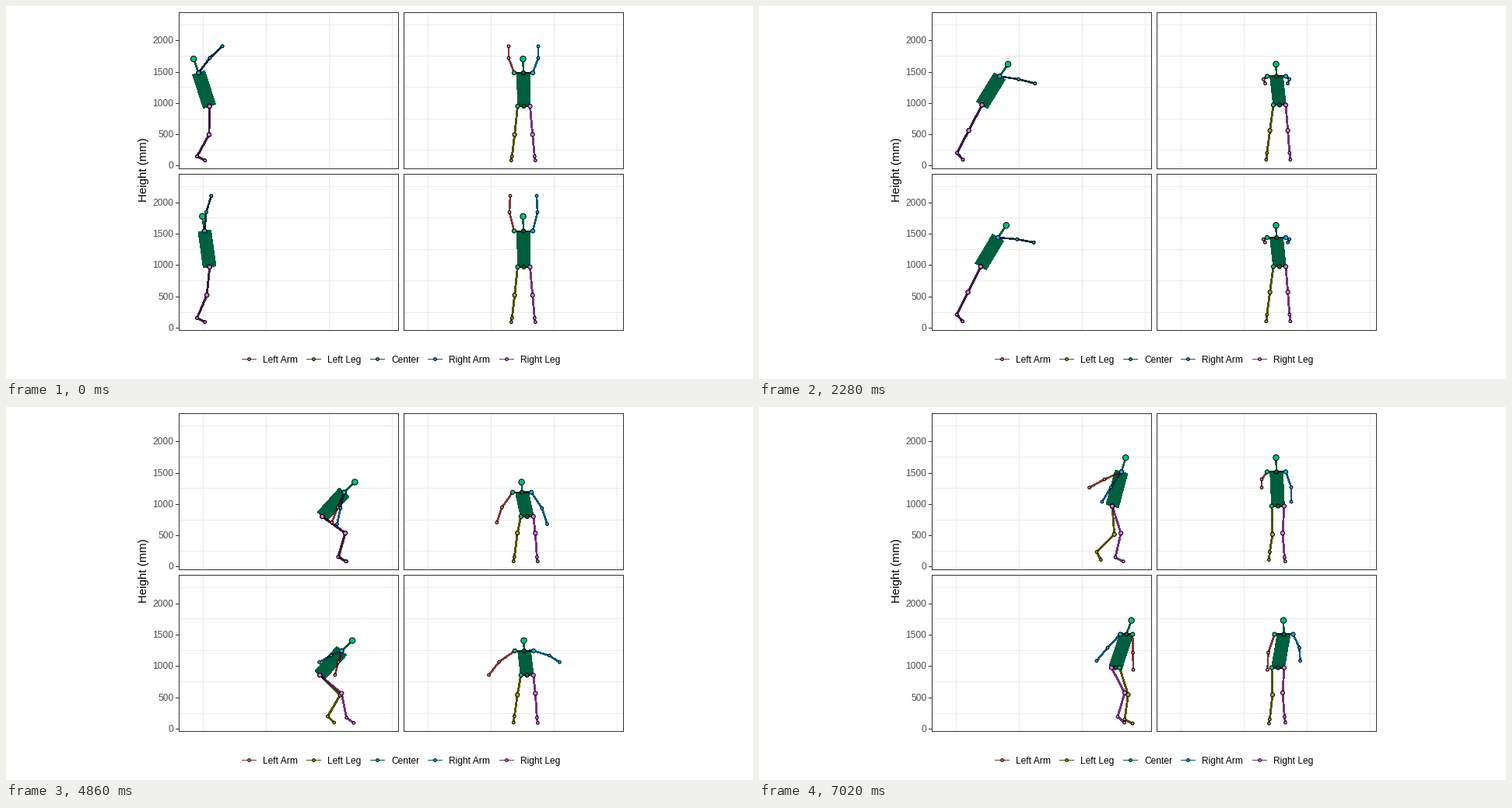
These frames come from a looping animation (960x480 px, 7040 ms). A matplotlib script:

```python
import matplotlib.pyplot as plt
import numpy as np
from matplotlib.animation import FuncAnimation
from matplotlib.collections import LineCollection
from matplotlib.patches import Rectangle

W, H, STEP, LOOP = 960, 480, 20, 7040
RED, OLIVE, GREEN, BLUE, PINK = "#F8766D", "#A3A500", "#00BF7D", "#00B0F6", "#E76BF3"
DARK, GREY, GRID = "#006040", "#333333", "#EBEBEB"

# Bone lengths in pixels
UPPER_ARM, FOREARM, THIGH, SHANK, FOOT, NECK = 25, 22, 36.5, 32, 11.5, 19
ROW_GAP, GROUND, MID_X = 208, 193, 664.5
FREEZE, FREEZE_LEN = 3620, 650  # the jump pauses on landing

# time, hip x, hip y, torso lean, arm angle, elbow flare, arm split
UPPER = [(0, 261, 128.5, -18, 143, 7, 0),
         (720, 242, 128.8, 28, 68, 10, 0),
         (1720, 248.7, 145.5, 75, -104, 10, 0),
         (2560, 314, 115, 8, 146, 2, 0),
         (2840, 347.5, 107, -2, 109, 1, 0),
         (3620, 387.2, 140.2, 35, -14, 14, -7),
         (4970, 427.2, 140.5, 46, -22, 12.5, -2),
         (5770, 453.5, 127, 15, -50, 7, -16)]
LOWER = [(0, 261.2, 127.3, -8, 175, 6, 0),
         (720, 249, 127.5, 18, 109, 6, 0),
         (1720, 249.2, 147.5, 71, -129, 8.5, 0),
         (2560, 312, 114, 8, 160, 2, 0),
         (2840, 344.2, 106, -3, 150, -1, 0),
         (3620, 380.2, 137.8, 25, 0, 24.2, 48),
         (4970, 427.2, 133.5, 54, -65, 12.7, -9),
         (6370, 457.7, 127, 18, -21, 8, 22)]

# Ankles: time, x, y up to the landing, then one step for each leg
JUMP = [(0, 245, 193), (720, 249.5, 191.5), (1720, 251, 193.5), (2200, 252, 191),
        (2560, 275, 168), (2840, 303.5, 147), (3620, 423, 191.5)]
STEPS = {(0, "l"): [(4970, 430, 193), (5770, 433.5, 186)],
         (0, "r"): [(4970, 429.5, 193), (5770, 457.5, 193)],
         (1, "l"): [(4970, 418.5, 187), (6370, 469.5, 193.5)],
         (1, "r"): [(4970, 456, 191), (6370, 460.5, 190)]}


def glide(t, kt, kv):
    """Monotone cubic through the keys, still outside them."""
    kt, kv = np.asarray(kt, float), np.asarray(kv, float)
    t = np.clip(t, kt[0], kt[-1])
    h = np.diff(kt)
    m = np.diff(kv) / h
    p, total = m[:-1] * m[1:], m[:-1] + m[1:]
    inner = np.where(p > 0, 2 * p / np.where(p > 0, total, 1), 0)
    d = np.r_[m[0], inner, m[-1]]
    i = np.clip(np.searchsorted(kt, t, "right") - 1, 0, len(h) - 1)
    u = (t - kt[i]) / h[i]
    return (kv[i] * (1 + 2 * u) * (1 - u) ** 2 + kv[i + 1] * u * u * (3 - 2 * u)
            + h[i] * (d[i] * u * (1 - u) ** 2 - d[i + 1] * u * u * (1 - u)))


def channels(t, keys):
    kt, *values = zip(*keys)
    return [glide(t, kt, v) for v in values]


def polar(deg):
    """Unit step x + iy on screen: 0 down, 90 forward, 180 up."""
    a = np.radians(deg)
    return np.sin(a) + 1j * np.cos(a)


def knee_of(hip, ankle):
    """Two-bone leg with the knee bending forward."""
    reach = np.abs(ankle - hip)
    along = (THIGH ** 2 - SHANK ** 2 + reach ** 2) / (2 * reach)
    bend = np.sqrt(np.maximum(THIGH ** 2 - along ** 2, 0))
    return hip + (along - 1j * bend) * (ankle - hip) / reach


def ankle_path(t, row, leg):
    # The second jumper lands a little shorter
    jump = [(k, x - row * 15.5 * max(k - 2200, 0) / (FREEZE - 2200), y) for k, x, y in JUMP]
    x, y = channels(t, jump + STEPS[row, leg])
    return x + 1j * y


def skeleton(t, row):
    """Joint -> (side x + iy, front x) for all times."""
    hip_x, hip_y, lean, arm, flare, split = channels(t, (UPPER, LOWER)[row])
    sway = glide(t, [0, 3620, 6370], [0.5, 5, 2])
    drift = glide(t, [3620, 4970, 6370 - 600 * (1 - row)], ([0, -3.5, 0], [0, 2.5, 9.5])[row])
    turn = row * glide(t, [4970, 6370], [0, 8])
    stance = glide(t, [4970, 6370], [14.5, 9.5])

    pelvis = hip_x + 1j * hip_y
    neck = pelvis + (48 - 9 * np.abs(np.sin(np.radians(lean)))) * polar(180 - lean)
    head = neck + NECK * polar(180 - 1.1 * lean)
    chest, waist, floor = MID_X + drift, MID_X + sway, MID_X + 0.7 * sway - 0.5
    joints = {"head": (head, chest - 0.5), "neck": (neck, chest), "pelvis": (pelvis, waist)}

    for s, sign in (("l", -1), ("r", 1)):
        swing = arm - sign * split
        shoulder = neck - sign * turn
        elbow = shoulder + np.sqrt(UPPER_ARM ** 2 - flare ** 2) * polar(swing)
        hand = elbow + np.sqrt(FOREARM ** 2 - (flare - 7) ** 2) * polar(0.93 * swing)
        hip = pelvis - sign * 0.65 * turn
        ankle = ankle_path(t, row, s)
        lift = np.maximum(GROUND - ankle.imag, 0)
        toe = ankle + FOOT * polar(np.maximum(63 - 5 * lift, -20))
        joints.update({
            s + "_sh": (shoulder, chest + sign * 12),
            s + "_el": (elbow, chest + sign * (12 + flare)),
            s + "_ha": (hand, chest + sign * (5 + 2 * flare)),
            s + "_hip": (hip, waist + sign * 8),
            s + "_kn": (knee_of(hip, ankle), (waist + floor) / 2 + sign * (stance - 3)),
            s + "_an": (ankle, floor + sign * stance),
            s + "_to": (toe, floor + sign * (stance + 1)),
        })
    return joints


clock = np.arange(0, LOOP, STEP, dtype=float)
clock = np.where(clock >= 5740, 5740 + (clock - 5740) // 40 * 40, clock)
clock -= np.clip(clock - FREEZE, 0, FREEZE_LEN)

figures = []  # one dict of joint -> (frames, 2) per panel
for row in range(2):
    body = skeleton(clock, row)
    figures.append({j: np.column_stack([p.real, p.imag + row * ROW_GAP])
                    for j, (p, _) in body.items()})
    figures.append({j: np.column_stack([x, p.imag + row * ROW_GAP])
                    for j, (p, x) in body.items()})

# Drawing order
LIMBS = [("neck pelvis", GREEN, 16.5),
         ("l_sh l_el l_ha", RED, 1.5), ("l_hip l_kn l_an l_to", OLIVE, 1.8),
         ("head neck", GREEN, 1.5), ("l_sh neck r_sh", DARK, 1.8),
         ("l_hip pelvis r_hip", DARK, 1.8),
         ("r_sh r_el r_ha", BLUE, 1.5), ("r_hip r_kn r_an r_to", PINK, 1.8)]
DOTS = [("l_ha l_el", RED), ("l_to l_an l_kn", OLIVE), ("neck pelvis", DARK),
        ("head l_sh l_hip", GREEN), ("r_ha r_el r_sh", BLUE),
        ("r_to r_an r_kn r_hip", PINK)]
DOT_JOINTS = [(j, c) for names, c in DOTS for j in names.split()]


def dot_size(joint):
    if joint == "head":
        return 7.4 ** 2
    return (3.7 if joint[2:] in ("ha", "el", "an", "to") else 5.2) ** 2


plt.rcParams["font.family"] = "Liberation Sans"
fig = plt.figure(figsize=(W / 72, H / 72), dpi=72, facecolor="white")
ax = fig.add_axes([0, 0, 1, 1])
ax.set(xlim=(-0.5, W - 0.5), ylim=(H - 0.5, -0.5))  # whole numbers are pixel centres
ax.axis("off")


def rule(x, y, color):
    ax.plot(x, y, color=color, lw=1, antialiased=False, solid_capstyle="butt", zorder=0)


for top, zero in ((7, 204.9), (215, 413.3)):
    for left, first in ((221, 252), (510, 541)):
        right, bottom = left + 282, top + 201
        for k in range(4):
            rule([first + 81 * k] * 2, [top, bottom], GRID)
        for k in range(5):
            rule([left, right], [int(zero - 20.2 - 40.4 * k)] * 2, GRID)
        ax.add_patch(Rectangle((left, top), right - left, bottom - top,
                               fill=False, ec=GREY, lw=1, antialiased=False, zorder=1))
    for k in range(5):
        y = int(zero - 40.3 * k)
        rule([217.5, 220.5], [y, y], GREY)
        ax.text(215, y + 4.5, str(500 * k), size=12, color="#4D4D4D", ha="right")
ax.text(176, 210.5, "Height (mm)", size=15, rotation=90, ha="center", va="center")

for x, label, color in ((311, "Left Arm", RED), (394, "Left Leg", OLIVE),
                        (476, "Center", GREEN), (550, "Right Arm", BLUE),
                        (642, "Right Leg", PINK)):
    rule([x - 9, x + 9], [453, 453], color)
    ax.plot([x - 9, x + 9], [453, 453], color="black", alpha=0.5, lw=1,
            antialiased=False, solid_capstyle="butt")
    ax.scatter([x], [453], s=3.7 ** 2, c=color, ec="black", lw=1, zorder=4)
    ax.text(x + 18.5, 458.3, label, size=12)

n = len(figures)
widths = [w for _, _, w in LIMBS] * n
limbs = LineCollection([], colors=[c for _, c, _ in LIMBS] * n, linewidths=widths,
                       antialiaseds=False, capstyle="butt", zorder=2)
shade = LineCollection([], colors=[(0, 0, 0, 0.5)], linewidths=widths,
                       antialiaseds=False, capstyle="butt", zorder=3)
ax.add_collection(limbs, autolim=False)
ax.add_collection(shade, autolim=False)
dots = ax.scatter(np.zeros(n * len(DOT_JOINTS)), np.zeros(n * len(DOT_JOINTS)),
                  s=[dot_size(j) for j, _ in DOT_JOINTS] * n,
                  c=[c for _, c in DOT_JOINTS] * n, ec="black", lw=1, zorder=4)


def draw(i):
    lines = [np.array([f[j][i] for j in names.split()])
             for f in figures for names, _, _ in LIMBS]
    limbs.set_segments(lines)
    shade.set_segments(lines)
    dots.set_offsets([f[j][i] for f in figures for j, _ in DOT_JOINTS])
    return limbs, shade, dots


anim = FuncAnimation(fig, draw, frames=LOOP // STEP, interval=STEP,
                     repeat=True, repeat_delay=0)
plt.show()
```
